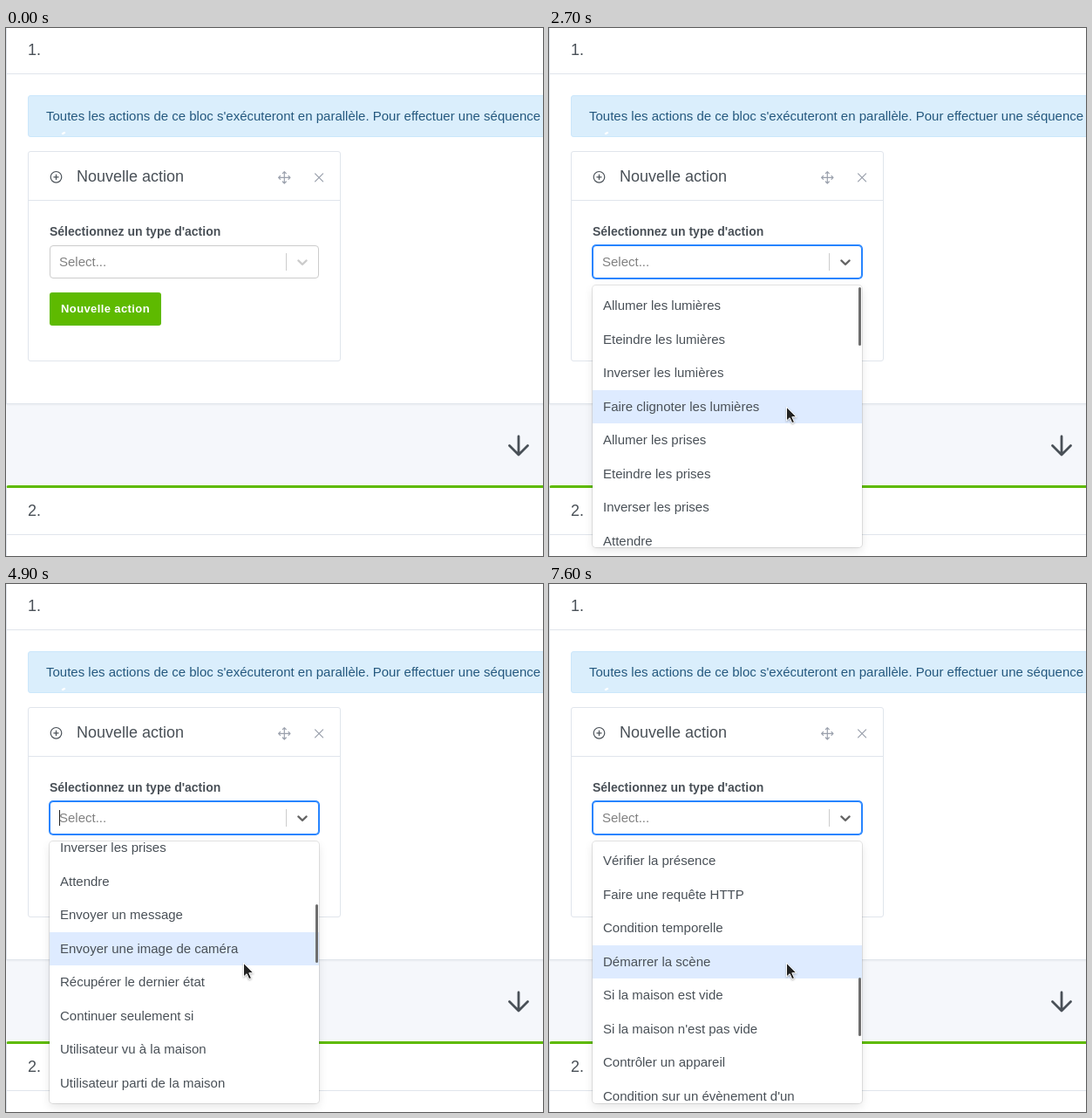
Animation, 616 px wide and 605 px high, one loop 8 s. Source, as an HTML page:

```html
<!DOCTYPE html>
<html lang="fr">
<head>
<meta charset="utf-8">
<title>Nouvelle action</title>
<style>
  html, body { margin: 0; width: 100%; height: 100%; overflow: hidden; }
  body { position: relative; background: #f5f7fb; color: #495057;
         font: 15px/20px "Liberation Sans", Arial, sans-serif; }
  body *, body { box-sizing: border-box; }
  body > *, .menu > i { position: absolute; white-space: nowrap; }
  .card { background: #fff; border: 1px solid #e0e5ec; }
  .page { left: 0; width: 640px; box-shadow: 0 1px 2px rgba(0, 0, 0, .05); }
  .rule { height: 1px; background: #e0e5ec; }
  .big { font-size: 18px; }
  .alert { left: 25px; top: 77px; width: 620px; height: 48px; border-radius: 3px;
           background: #daeefc; border: 1px solid #cbe7fb; }
  .button { left: 50px; top: 303px; width: 128px; height: 38px; border-radius: 3px;
            background: #5eba00; color: #fff; font: bold 13px/38px "Liberation Sans", Arial, sans-serif;
            letter-spacing: .03em; text-align: center; }
  .select { left: 50px; top: 249px; width: 309px; height: 38px; border: 1px solid #ccc;
            border-radius: 4px; background: #fff; }
  .select.hover { border-color: #b3b3b3; }
  .select.open { border-color: #2684ff; box-shadow: 0 0 0 1px #2684ff; }
  .menu { left: 50px; top: 295px; width: 309px; height: 300px; border-radius: 4px; background: #fff;
          box-shadow: 0 0 0 1px rgba(0, 0, 0, .1), 0 4px 11px rgba(0, 0, 0, .1); overflow: hidden; }
  .list { padding: 4px 0; }
  .list div { height: 38.5px; padding: 8px 12px; line-height: 22.5px; white-space: nowrap; }
  .list .on { background: #deebff; }
  .menu > i { left: 305px; top: 2px; width: 3px; height: 67px; border-radius: 2px; background: #6e6e6e; }
  svg { left: 0; top: 0; fill: none; stroke-linecap: round; stroke-linejoin: round; }
</style>
</head>
<body>
<div class="card page" style="top:-10px;height:441px"></div>
<div class="rule" style="left:0;top:52px;width:616px"></div>
<div class="big" style="left:25px;top:15px">1.</div>

<div class="alert"></div>
<div style="left:46px;top:91px;color:#24587e">Toutes les actions de ce bloc s'exécuteront en parallèle. Pour effectuer une séquence</div>

<div class="card" style="left:25px;top:141px;width:359px;height:241px;border-radius:3px"></div>
<div class="rule" style="left:25px;top:197px;width:359px"></div>
<div class="big" style="left:81px;top:160px">Nouvelle action</div>
<div style="left:50px;top:223px;font-size:14px;font-weight:bold">Sélectionnez un type d'action</div>
<div class="button">Nouvelle action</div>

<div class="card page" style="top:524px;height:100px;border-top:3px solid #5eba00;border-radius:3px 0 0 0"></div>
<div class="rule" style="left:0;top:580px;width:616px"></div>
<div class="big" style="left:25px;top:543px">2.</div>

<div class="select" id="select"></div>
<div style="left:61px;top:258px;color:#808080">Select...</div>
<div id="caret" style="left:61px;top:259px;width:1px;height:18px;background:#222"></div>
<div style="left:321px;top:258px;width:1px;height:20px;background:#ccc"></div>

<svg width="616" height="605">
  <path d="M65 121l2-1" stroke="#fff" stroke-width="2.4"/>
  <g stroke="#495057" stroke-width="1.2">
    <circle cx="57.5" cy="170.8" r="6.3"/>
    <path d="M57.5 168.2v5.2M54.9 170.8h5.2"/>
  </g>
  <g stroke="#9aa0ac" stroke-width="1.2">
    <path d="M319.3 164.6v13.4M312.6 171.3h13.4M317.3 166.6l2-2l2 2M317.3 176l2 2l2-2M314.6 169.3l-2 2l2 2M324 169.3l2 2l-2 2"/>
    <path d="M354.6 166.8l9 9M363.6 166.8l-9 9"/>
  </g>
  <path d="M588 468v21M577.5 478.5l10.5 10.5l10.5-10.5" stroke="#495057" stroke-width="2.8"/>
  <path id="chevron" d="M335.3 266.4l4.7 4.5l4.7-4.5" stroke-width="2.2"/>
</svg>

<div class="menu" id="menu"><div class="list" id="list"></div><i id="thumb"></i></div>

<svg id="pointer" width="16" height="24" style="overflow:visible">
  <path d="M.5 .5v15.5l3.6-3.3l2.7 6l2.7-1.2l-2.7-5.8h4.8z" fill="#222" stroke="#fff" stroke-width="1"
        style="filter:drop-shadow(0 1px 1px rgba(0,0,0,.3))"/>
</svg>

<script>
const LOOP = 8000, STEP = 100, ROW = 38.5, NOTCH = 108, ROLL = 300;
const OPEN = 1400;
const labels = [
  "Allumer les lumières", "Eteindre les lumières", "Inverser les lumières", "Faire clignoter les lumières",
  "Allumer les prises", "Eteindre les prises", "Inverser les prises", "Attendre",
  "Envoyer un message", "Envoyer une image de caméra", "Récupérer le dernier état", "Continuer seulement si",
  "Utilisateur vu à la maison", "Utilisateur parti de la maison", "Vérifier la présence",
  "Faire une requête HTTP", "Condition temporelle", "Démarrer la scène", "Si la maison est vide",
  "Si la maison n'est pas vide", "Contrôler un appareil", "Condition sur un évènement d'un"
];
// Wheel notches: start of the roll, moment the hovered row is refreshed
const rolls = [[2750, 3100], [3818, 4200], [4794, 5200], [6050, 6400], [7055, 7400]];
const caretToggles = [OPEN, 2700, 3900, 5100, 6300, 7600];
// Pointer path: time, x, y
const path = [[300, 300, 37], [1100, 334, 269], [1200, 339, 271], [OPEN - 50, 339, 271], [2100, 272, 434]];

const $ = id => document.getElementById(id);
const [select, caret, chevron, menu, list, thumb, pointer] =
  ["select", "caret", "chevron", "menu", "list", "thumb", "pointer"].map($);
const rows = labels.map(text => {
  const row = document.createElement("div");
  row.textContent = text;
  return list.appendChild(row);
});

const clamp = u => Math.max(0, Math.min(1, u));
const smooth = u => u * u * (3 - 2 * u);
const show = (el, on) => { el.style.visibility = on ? "visible" : "hidden"; };

function pointerAt(t) {
  let [, x, y] = path[0];
  for (let i = 1; i < path.length; i++) {
    const [t0, x0, y0] = path[i - 1], [t1, x1, y1] = path[i];
    if (t < t0) break;
    const k = smooth(clamp((t - t0) / (t1 - t0)));
    x = x0 + (x1 - x0) * k;
    y = y0 + (y1 - y0) * k;
  }
  return [Math.round(x), Math.round(y)];
}

function draw(t) {
  const open = t >= OPEN;
  const [x, y] = pointerAt(t);
  const visible = t >= path[0][0];
  const over = visible && x >= 50 && x < 359 && y >= 249 && y < 287;

  show(pointer, visible);
  pointer.style.transform = `translate(${x}px, ${y}px)`;

  select.className = "select" + (open ? " open" : over ? " hover" : "");
  const hot = over && x > 321;
  chevron.setAttribute("stroke", open ? (hot ? "#333" : "#666") : hot ? "#999" : "#ccc");
  show(caret, caretToggles.filter(c => t >= c).length % 2 === 1);

  show(menu, open);
  let scroll = 0, settled = 0;
  for (const [start, end] of rolls) {
    scroll += NOTCH * smooth(clamp((t - start) / ROLL));
    if (t >= end) settled += NOTCH;
  }
  scroll = Math.round(scroll);
  list.style.transform = `translateY(${-scroll}px)`;
  thumb.style.transform = `translateY(${Math.round(scroll * .285)}px)`;
  const hovered = Math.max(0, Math.floor((y - 299 + settled) / ROW));
  rows.forEach((row, i) => { row.className = i === hovered ? "on" : ""; });
}

const begin = performance.now();
function tick() {
  const t = (performance.now() - begin) % LOOP;
  draw(Math.floor(t / STEP) * STEP);
  requestAnimationFrame(tick);
}
tick();
</script>
</body>
</html>
```
